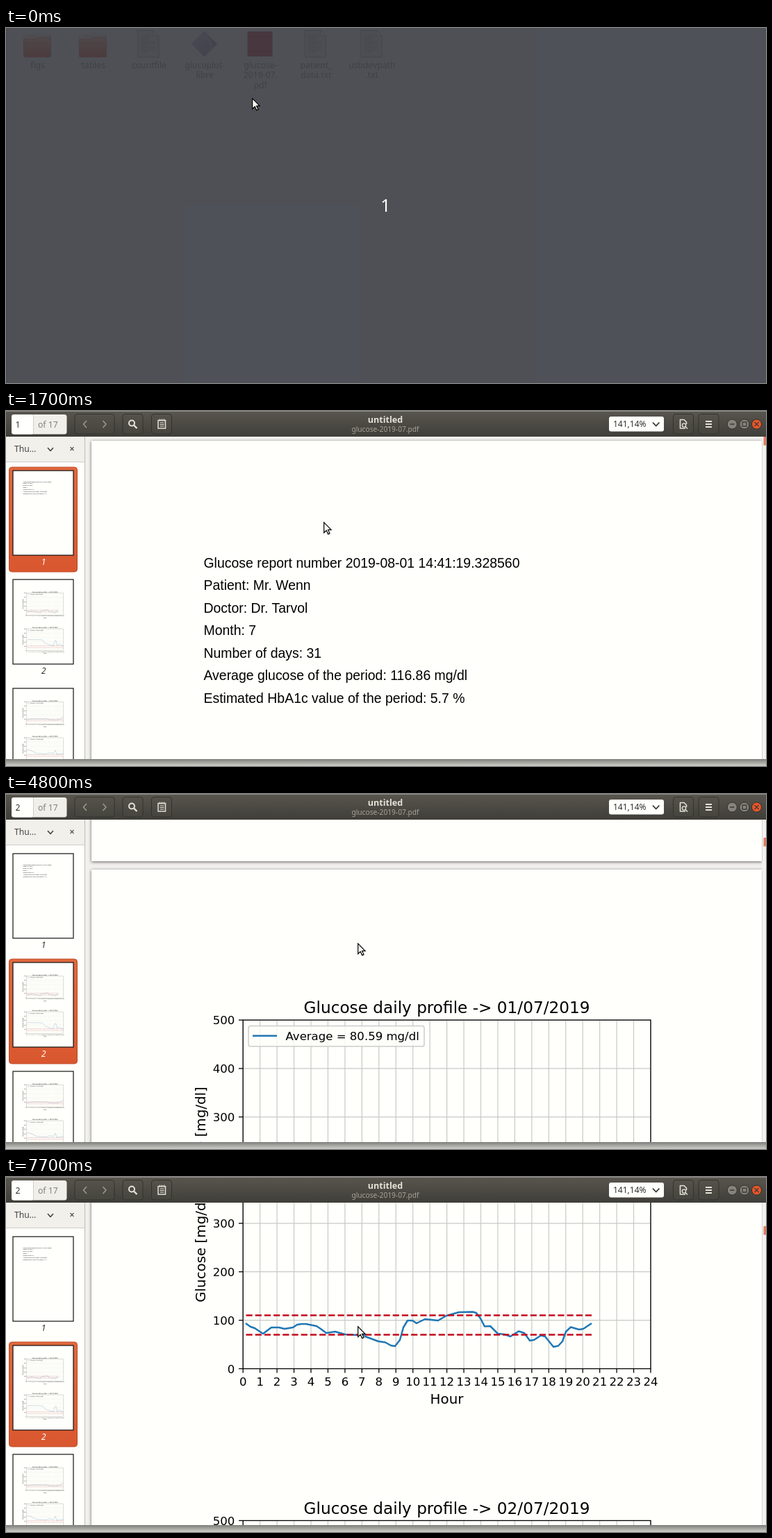
An HTML page for the animation above (8 s loop, 1094x512 px).

```html
<!DOCTYPE html>
<html lang="en">
<head>
<meta charset="utf-8">
<title>Glucose report viewer</title>
<style>
html, body { margin: 0; width: 100%; height: 100%; overflow: hidden; background: #f0f0ea; }
svg { display: block; width: 1094px; height: 512px; }
.ui { font-family: "Noto Sans", "Open Sans", sans-serif; font-size: 12.2px; }
.report { font-family: "Liberation Sans", Arial, sans-serif; font-size: 19.45px; }
.chart { font-family: "DejaVu Sans", sans-serif; font-size: 16.56px; }
.mid { text-anchor: middle; }
.end { text-anchor: end; }
.line { fill: none; stroke-linejoin: round; }
.sheet { fill: #fffffb; filter: drop-shadow(0 1px 2px #0009); }
</style>
</head>
<body>
<svg id="stage" viewBox="0 0 1094 512"></svg>
<script>
const STEP = 57, PAGE_TOP = 43, PAGE_GAP = 1377, LOOP = 8000;
const range = (n, f) => Array.from({ length: n }, (_, i) => f(i)).join('');
const rect = (x, y, w, h, fill, more = '') =>
  `<rect x="${x}" y="${y}" width="${w}" height="${h}" fill="${fill}" ${more}/>`;
const text = (x, y, s, more = '') => `<text x="${x}" y="${y}" ${more}>${s}</text>`;
const line = (d, stroke, width = 1, more = '') =>
  `<path class="line" d="${d}" stroke="${stroke}" stroke-width="${width}" ${more}/>`;
const group = (s, more = '') => `<g ${more}>${s}</g>`;
const gradient = (id, a, b, more = 'x2="0" y2="1"') =>
  `<linearGradient id="${id}" ${more}><stop stop-color="${a}"/><stop offset="1" stop-color="${b}"/></linearGradient>`;

// File manager
const folder = x => group(
  rect(-19, 10, 38, 14, '#f3efe8', 'rx="1.5" stroke="#c9b8a8"') +
  line('M-15 12.5H-4', '#e58a66', 1.5) +
  `<path d="M-19.5 17q0-1.5 1.5-1.5H-3l3-2.5H18q1.500 0 1.500 1.500V40.500q0 1.500-1.500 1.500H-18q-1.500 0-1.500-1.500z" fill="url(#orange)" stroke="#c9512a" stroke-width=".8"/>`,
  `transform="translate(${x})"`);

const textFile = x => group(
  '<path d="M-15 3.500H7l8 8V42H-15z" fill="#dcdcd7" stroke="#a3a39e"/>' +
  '<path d="M7 3.500V11.500H15z" fill="#f4f4f0" stroke="#a3a39e"/>' +
  range(9, i => line(`M-11 ${10 + i * 3}h${i < 2 ? 15 : [21, 20, 12][i % 3]}`, '#a4a49f', 1.2)),
  `transform="translate(${x})"`);

const program = x => group(
  '<path d="M0 5L18 23 0 41-18 23z" fill="url(#violet)" stroke="#8d8b9c" stroke-linejoin="round"/>' +
  line('M-9 14A14 14 0 0 1 9 32', '#d9c3d0', 3, 'stroke-dasharray="2.500 2"') +
  line('M-7 16A10 10 0 0 1 5 33', '#b7a9c4', 1.5),
  `transform="translate(${x} 0)"`);

const labels = [['figs'], ['tables'], ['countfile'], ['glucoplot-', 'libre'],
  ['glucose-', '2019-07.', 'pdf'], ['patient_', 'data.txt'], ['usbdevpath', '.txt']];
const label = (words, i) => group(
  words.map((w, k) => text(45.5 + i * 80.2, 57.5 + k * 14.7, w)).join(''), i === 4 ? 'id="picked"' : '');

const files = rect(0, 0, 1094, 512, '#f0f0ea') + rect(0, 0, 1.6, 512, '#bdbdb7') +
  folder(45) + folder(125) + textFile(205) + program(285.5) +
  rect(347.5, 5, 36, 36, '#bf1f22') + textFile(445.5) + textFile(526) +
  rect(339, 45, 54, 46, '#f07746', 'rx="3" id="mark"') +
  group(labels.map(label).join(''), 'class="ui mid" id="labels"');

// Report pages: x as on the stage, y from the top of the page
const cover = group([
  'Glucose report number 2019-08-01 14:41:19.328560', 'Patient: Mr. Wenn', 'Doctor: Dr. Tarvol',
  'Month: 7', 'Number of days: 31', 'Average glucose of the period: 116.86 mg/dl',
  'Estimated HbA1c value of the period: 5.7 %'
].map((s, i) => text(284.5, 183 + i * 32.42, s)).join(''), 'class="report"');

const hourX = h => 341.2 + h * 24.45;
const levelY = v => 447.5 - v * 0.699;
const limit = (v, end) =>
  line(`M345.500 ${levelY(v)}H${end}`, '#c40a1c', 2.5, 'stroke-dasharray="9.200 4"');

function chart(y, day, average, curve, end = 925) {
  return group(
    range(25, h => line(`M${hourX(h)} 98V447.500`, '#c8cac6', 1.2)) +
    range(6, i => line(`M341 ${levelY(i * 100)}H928`, '#c8cac6', 1.2)) +
    line('M' + curve, '#1f77b4', 2.5) + limit(110, end) + limit(70, end) +
    range(25, h => line(`M${hourX(h)} 447.500v6`, '#000', 1.3) +
      text(hourX(h), 472, h, 'class="mid"')) +
    range(6, i => line(`M341 ${levelY(i * 100)}h-6`, '#000', 1.3) +
      text(329.4, levelY(i * 100) + 6.2, i * 100, 'class="end"')) +
    rect(341.2, 98, 586.8, 349.5, 'none', 'stroke="#000" stroke-width="1.300"') +
    rect(349, 106.5, 253, 29.500, '#fffffb', 'rx="3" stroke="#ccc" stroke-width="1.500" fill-opacity=".8"') +
    line('M355 120.700H390', '#1f77b4', 2.5) +
    text(402.5, 126.5, `Average = ${average} mg/dl`) +
    text(634.5, 88, `Glucose daily profile -&gt; ${day}/07/2019`, 'class="mid" font-size="23.180"') +
    text(634.5, 497.5, 'Hour', 'class="mid" font-size="19.870"') +
    text(0, 0, 'Glucose [mg/dl]', 'class="mid" font-size="19.870" transform="translate(287 273) rotate(-90)"'),
    `class="chart" transform="translate(0 ${y + 119})"`);
}

const firstDay = '345 382L352 387 358 389 370 397 382 388 393 388 401 390 413 388 419 384 425 383 432 383 ' +
  '447 386 453 390 461 396 474 394 488 398 507 399 513 396 517 401 536 408 546 409.500 554 414 560 415 ' +
  '567 406 572 388 578 378 585 378 591 382 603 376 622 378 634 371 652 366 672 365.500 677 367 683 375 ' +
  '689 386.500 697 386 708 397 718 398 726 401 738 393.500 746 396 754 407 760 406 770 399.500 776 401 ' +
  '788 416 795 414.500 801 408 806 394 813 387.500 825 391 831 390 843 382';
const pages = [cover,
  chart(0, '01', '80.59', firstDay, 843) +
  chart(568.5, '02', '198.21', '345 290L365 270 590 275 640 330 720 360 770 365 790 290 810 285 825 360 860 345 925 375'),
  chart(0, '03', '104.37', '345 385L400 370 500 366 600 372 640 362 700 382 800 388 870 375 925 330') +
  chart(568.5, '04', '142.80', '345 290L400 300 500 350 650 358 700 340 770 350 800 300 820 365 925 350')];

// Viewer window
const button = (x, w = 29) => rect(x, 4.5, w, 28.5, 'url(#knob)', 'rx="3.500" stroke="#33322d"');
const pale = '#e4e2d8';
const header = rect(0, 0, 1094, 37, 'url(#bar)') + rect(0, 0, 1094, 1, '#8d8b84') +
  rect(8, 5, 79.5, 28.5, '#f0efea', 'rx="3.500"') + rect(8, 5, 31.5, 28.5, '#fffffb', 'rx="3.500"') +
  line('M39.500 5V33.500', '#cfcdc6') +
  text(13.5, 24, '1', 'id="number" fill="#333"') + text(46, 24, 'of 17', 'fill="#84827c"') +
  button(99, 57) + line('M116 14l-4.500 5 4.500 5M139.500 14l4.500 5-4.500 5', '#9a988f', 1.6) +
  button(168) + '<circle cx="181" cy="17.500" r="4" fill="none" stroke="#e4e2d8" stroke-width="2"/>' +
  line('M184 20.500l4.500 4.500', pale, 2.4) +
  button(209.5) + rect(219, 13.5, 10.5, 11.5, 'none', `stroke="${pale}" stroke-width="1.500"`) +
  line('M221.500 17h6M221.500 19.500h6M221.500 22h6M221.500 11.500v3M224.500 11.500v3M227.500 11.500v3', pale, 1.2) +
  text(546, 17, 'untitled', 'class="mid" font-weight="700" font-size="12.600" fill="#e6e3d9"') +
  text(546, 30, 'glucose-2019-07.pdf', 'class="mid" font-size="10.200" fill="#a5a398"') +
  rect(868, 8, 79, 21.500, '#fffffb', 'rx="3"') + text(874, 23.2, '141,14%', 'fill="#333" font-size="12"') +
  line('M931 16.500l4.700 5 4.700-5', '#333', 1.8) +
  button(960.5) + line('M978 25H970.500V12.500h5.500l3.500 3.500v3', pale, 1.6) +
  '<circle cx="976" cy="20.500" r="2.600" fill="none" stroke="#e4e2d8" stroke-width="1.400"/>' +
  line('M978 22.500l3 3', pale, 1.6) +
  button(997) + line('M1007 15h9M1007 19h9M1007 23h9', pale, 1.8) +
  range(3, i => `<circle cx="${1045.3 + i * 17.6}" cy="19" r="7" fill="${i < 2 ? '#85837b' : '#e9562a'}" stroke="#32312c"/>`) +
  line('M1042 19h6.500M1060 16h6v6h-6zM1077.500 16l6 6m0-6l-6 6', '#3c3b36', 1.3);

const thumb = i => group(
  rect(10, 86, 87, 122, '#fffffb', 'stroke="#111" stroke-width="1.200"') +
  group(pages[i], 'transform="translate(10 86) scale(.0904) translate(-123 0)"') +
  text(54, 222, i + 1, `id="tag${i}" class="mid" font-style="italic"`),
  `transform="translate(0 ${i * 157})"`);
const sidebar = rect(0, 37, 114, 465, '#fffffb') + rect(0, 37, 113, 36.5, '#f1f0eb') +
  line('M0 73.500H113', '#cfcec8') +
  text(12, 59, 'Thu…', 'fill="#444"') +
  line('M60 53l4 4.500 4-4.500', '#444', 1.6) + line('M92.500 52l5 5m0-5l-5 5', '#555', 1.2) +
  rect(4.5, 81, 98, 151, 'url(#pick)', 'id="pickbox" rx="4" stroke="#bf4a26"') +
  group(range(3, thumb), 'id="thumbs"') + line('M113.500 37V502', '#bdbcb6');

const sheets = pages.map((p, i) => group(
  '<rect class="sheet" x="123" width="965" height="1365"/>' + p,
  `transform="translate(0 ${PAGE_TOP + i * PAGE_GAP})"`)).slice(0, 2).join('');
const viewer = rect(0, 502, 1094, 10, 'url(#shade)') + rect(0, 37, 1094, 465, '#f1f0ec') +
  group(group(sheets, 'id="doc"'), 'clip-path="url(#view)"') +
  rect(1088.5, 37, 5.5, 465, '#f3f2ee') + rect(1090.5, 0, 3.5, 12.5, '#e17c60', 'id="thumb"') +
  group(sidebar, 'clip-path="url(#side)"') + header;

const stage = document.getElementById('stage');
stage.innerHTML = '<defs>' +
  gradient('orange', '#f4a981', '#d8431b') + gradient('pick', '#e0683f', '#d9572f') +
  gradient('violet', '#c9c3d6', '#70708c', 'x2="1" y2="1"') +
  gradient('bar', '#58564e', '#3f3e39') + gradient('knob', '#55534b', '#45443e') +
  gradient('shade', '#7d7d79', '#cfcfca') +
  `<clipPath id="view">${rect(114, 37, 980, 465, '#000')}</clipPath>` +
  `<clipPath id="side">${rect(0, 37, 114, 465, '#000')}</clipPath></defs>` +
  files + group(viewer, 'class="ui" id="viewer"') +
  group(rect(0, 0, 1094, 512, '#383b43', 'fill-opacity=".880"') +
    text(546.5, 265, '1', 'class="ui mid" fill="#fff" style="font-size:25px"'), 'id="countdown"') +
  '<path id="cursor" d="M.7.700V15.500l3.500-3.300 2.500 5.400 2.300-1-2.400-5.300h4.500z" fill="#fafaf5" stroke="#000" stroke-width="1.200"/>';

// Wheel steps reached at each time, and the pointer's path
const wheel = [[0, 0], [2700, 2], [3000, 4], [3100, 6], [3300, 8], [3400, 10], [3600, 12], [3900, 14],
  [4200, 17], [4300, 18], [4500, 20], [4800, 23], [5000, 25], [5300, 26], [5500, 27],
  [7300, 28], [7600, 29], [7700, 30]];
const pointer = [[0, 354, 101], [100, 356, 96], [400, 364, 32], [1300, 364, 32], [1700, 457, 160],
  [2100, 506, 210], [2400, 506, 210], [2500, 506, 215], [LOOP, 506, 215]];

const $ = id => document.getElementById(id);
const set = (id, name, value) => $(id).setAttribute(name, value);
const show = (id, on) => set(id, 'visibility', on ? 'visible' : 'hidden');

function pointerAt(t) {
  const i = pointer.findIndex(p => p[0] > t);
  const [t0, x0, y0] = pointer[i - 1], [t1, x1, y1] = pointer[i];
  const k = (t - t0) / (t1 - t0);
  return [x0 + (x1 - x0) * k, y0 + (y1 - y0) * k].map(Math.round);
}

function draw(t) {
  const scroll = STEP * wheel.filter(w => w[0] <= t).pop()[1];
  const page = t < 4800 ? 0 : 1;
  const chosen = t >= 800;
  show('countdown', t < 100);
  show('viewer', t >= 1300);
  show('doc', t >= 1400);
  show('thumbs', t >= 1400);
  show('pickbox', t >= 1400);
  set('viewer', 'opacity', t < 1400 ? 0.9 : 1);
  show('mark', chosen);
  set('labels', 'fill', chosen ? '#3c3c3c' : '#70706c');
  set('picked', 'fill', chosen ? '#fff' : '#70706c');
  set('doc', 'transform', `translate(0 ${-scroll})`);
  set('thumb', 'y', 37 + scroll * 0.0198);
  set('pickbox', 'y', 81 + page * 157);
  set('tag0', 'fill', page ? '#333' : '#fff');
  set('tag1', 'fill', page ? '#fff' : '#333');
  $('number').textContent = page + 1;
  set('cursor', 'transform', `translate(${pointerAt(t)})`);
}

let last = -1;
function tick() {
  const t = Math.floor(performance.now() % LOOP / 100) * 100;
  if (t !== last) draw(last = t);
  requestAnimationFrame(tick);
}
tick();
</script>
</body>
</html>
```
